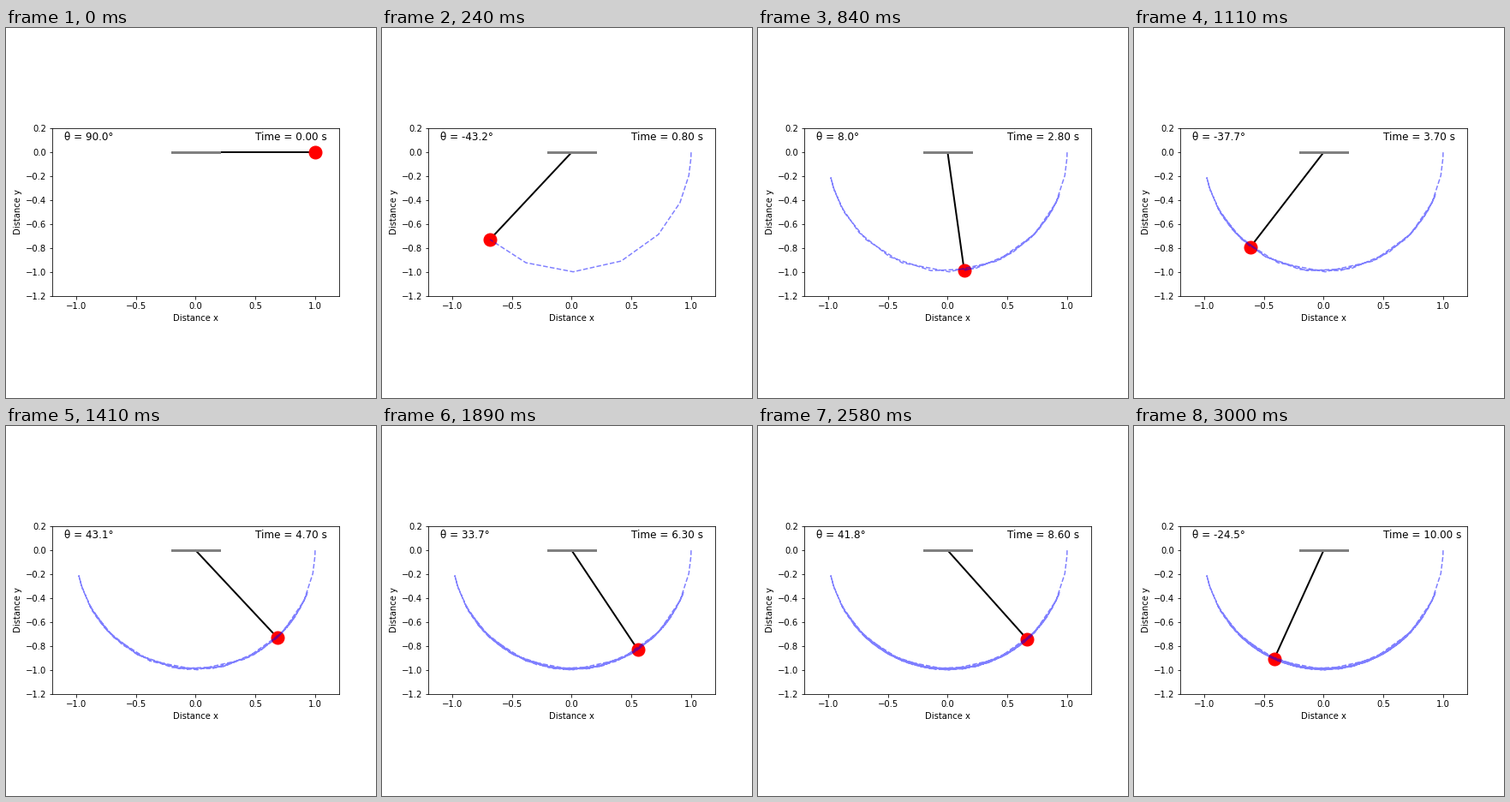
Recreate the animation shown at these times as a matplotlib script. Size 432x432 px, loop 3030 ms.

```python
import numpy as np
import matplotlib.pyplot as plt
from matplotlib.animation import FuncAnimation

FRAMES = 101
STEP = 0.1      # simulated seconds per frame
SUBSTEPS = 10

# Measured angles in degrees, used to calibrate gravity and drag
TIMES = np.array([1.7, 2.8, 4.7, 6.3, 8.6, 10.0])
ANGLES = np.array([-8.0, 8.0, 43.1, 33.7, 41.8, -24.5])


def swing(params):
    """Angles (degrees) of a unit pendulum released at 90, one column per row of params."""
    g, b, c = np.atleast_2d(params).T

    def slope(state):
        th, w = state
        return np.array([w, -g * np.sin(th) - (b + c * np.abs(w)) * w])

    h = STEP / SUBSTEPS
    state = np.array([np.full_like(g, np.pi / 2), np.zeros_like(g)])
    out = [state[0]]
    for _ in range(FRAMES - 1):
        for _ in range(SUBSTEPS):
            k1 = slope(state)
            k2 = slope(state + h / 2 * k1)
            k3 = slope(state + h / 2 * k2)
            k4 = slope(state + h * k3)
            state = state + h / 6 * (k1 + 2 * k2 + 2 * k3 + k4)
        out.append(state[0])
    return np.degrees(out)


def calibrate(params, eps=1e-5, rounds=8):
    """Gauss-Newton fit of (gravity, linear drag, quadratic drag)."""
    rows = np.rint(TIMES / STEP).astype(int)
    for _ in range(rounds):
        trial = np.vstack([params, params + eps * np.eye(3)])
        fit = swing(trial)[rows]
        jac = (fit[:, 1:] - fit[:, :1]) / eps
        params = params + np.linalg.lstsq(jac, ANGLES - fit[:, 0], rcond=None)[0]
    return params


theta = swing(calibrate(np.array([9.81, 0.0, 0.057])))[:, 0]
x = np.sin(np.radians(theta))
y = -np.cos(np.radians(theta))

plt.rcParams.update({"font.family": "DejaVu Sans", "font.size": 10})
fig, ax = plt.subplots(figsize=(6, 6), dpi=72)
fig.subplots_adjust(left=0.125, right=0.9, bottom=0.125, top=0.88)
ax.set_aspect("equal")
ax.set_xlim(-1.2, 1.2)
ax.set_ylim(-1.2, 0.2)
ax.set_xticks(np.linspace(-1, 1, 5))
ax.set_yticks(np.linspace(-1.2, 0.2, 8).round(1))
ax.set_xlabel("Distance x")
ax.set_ylabel("Distance y")

rod, = ax.plot([], [], "k-", lw=2)
ax.plot([-0.2, 0.2], [0, 0], color="gray", lw=3)
bob, = ax.plot([], [], "ro", ms=15)
trail, = ax.plot([], [], "b--", lw=1.5, alpha=0.5)
angle_text = ax.text(-1.1, 0.1, "", fontsize=12)
time_text = ax.text(0.5, 0.1, "", fontsize=12)


def update(i):
    rod.set_data([0, x[i]], [0, y[i]])
    bob.set_data([x[i]], [y[i]])
    trail.set_data(x[:i + 1], y[:i + 1])
    angle_text.set_text(f"θ = {theta[i]:.1f}°")
    time_text.set_text(f"Time = {i * STEP:.2f} s")
    return rod, bob, trail, angle_text, time_text


anim = FuncAnimation(fig, update, frames=FRAMES, init_func=lambda: update(0),
                     interval=30, repeat=True, repeat_delay=0)
plt.show()
```
